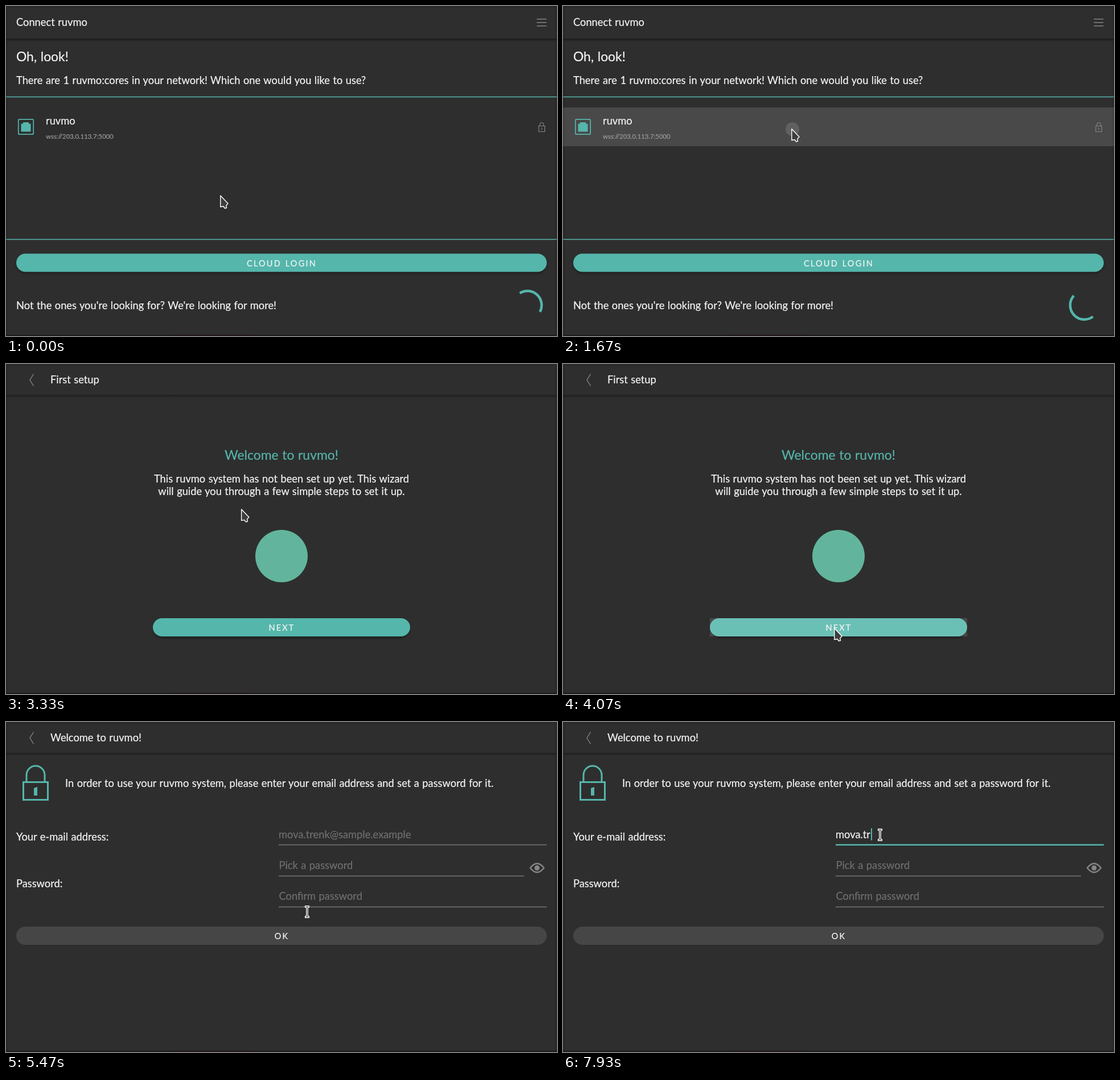
Recreate the animation shown at these times as an HTML page. Size 968 by 579 pixels, loop 8 s.

```html
<!DOCTYPE html>
<html lang="en">
<head>
<meta charset="utf-8">
<title>First setup</title>
<style>
  html, body { margin: 0; width: 100%; height: 100%; overflow: hidden; background: #2e2e2e; }
  svg { display: block; width: 100%; height: 100%; }
  text {
    font: 18.3px Lato, "Noto Sans", sans-serif; word-spacing: .8px; white-space: pre;
    color: #f6f6f6; fill: currentColor; stroke: currentColor; stroke-width: .2px;
  }
  .big { font-size: 22.9px; }
  .small { font-size: 11.3px; color: #9c9c9c; }
  .mid { text-anchor: middle; }
  .btn { font-size: 14.5px; letter-spacing: 2.2px; text-anchor: middle; }
  .hint { color: #6f6f6f; }
  .teal { color: #55b6ab; fill: currentColor; }
  .line { fill: none; stroke: #55b6ab; }
  .grey { fill: none; stroke: #858585; }
  .field { stroke: #757575; stroke-width: 1.5; }
  .glow { fill: #fff; opacity: .13; }
</style>
</head>
<body>
<svg viewBox="0 0 968 579">
  <defs>
    <linearGradient id="down" x2="0" y2="1">
      <stop stop-color="#000" stop-opacity=".38"/><stop offset="1" stop-color="#000" stop-opacity="0"/>
    </linearGradient>
    <linearGradient id="side">
      <stop stop-color="#000" stop-opacity="0"/><stop offset="1" stop-color="#000" stop-opacity=".35"/>
    </linearGradient>
    <filter id="soft" x="-5%" y="-50%" width="110%" height="200%"><feGaussianBlur stdDeviation="2"/></filter>
    <clipPath id="rowClip"><rect y="178" width="968" height="68"/></clipPath>
    <clipPath id="nextClip"><rect x="258" y="446" width="452" height="32"/></clipPath>
    <g id="back">
      <rect width="968" height="579" fill="#2e2e2e"/>
      <rect x="-9" width="9" height="579" fill="url(#side)"/>
    </g>
    <g id="bar">
      <rect y="54.500" width="968" height="4.500" fill="url(#down)"/>
      <path class="grey" d="M48.500 17.500L42 28l6.500 10.500" stroke-width="1.4"/>
    </g>
  </defs>
  <rect width="968" height="579" fill="#2e2e2e"/>

  <g id="connect">
    <use href="#back"/>
    <rect y="57" width="968" height="6" fill="url(#down)"/>
    <text x="18" y="35">Connect ruvmo</text>
    <path class="grey" d="M932.500 23h17M932.500 29h17M932.500 35h17" stroke-width="1.4"/>
    <text class="big" x="18" y="97">Oh, look!</text>
    <text x="18" y="136.500">There are 1 ruvmo:cores in your network! Which one would you like to use?</text>
    <path class="line" d="M0 159.500H968M0 409.500H968" stroke-width="1.6"/>
    <g clip-path="url(#rowClip)">
      <rect id="rowHover" class="glow" y="178" width="968" height="68"/>
      <circle id="rowRipple" class="glow" cx="403" cy="216"/>
    </g>
    <rect class="line" x="21.800" y="198.800" width="26.400" height="26.400" rx="2" stroke-width="1.7"/>
    <path class="teal" d="M26.500 206.500h3.500v-2.500h10v2.500h3.500v14h-17z"/>
    <text x="70" y="207.500">ruvmo</text>
    <text class="small" x="70" y="233">wss://203.0.113.7:5000</text>
    <path class="grey" d="M936 210.500h10.500v10H936zM938 210v-2a3.200 3.200 0 0 1 6.500 0v2M941.200 213.500v4" stroke-width="1.2"/>
    <rect x="19" y="437" width="930" height="32" rx="16" opacity=".4" filter="url(#soft)"/>
    <rect class="teal" x="18" y="434.500" width="932" height="32" rx="16"/>
    <text class="btn" x="484.500" y="456.500">CLOUD LOGIN</text>
    <text x="18" y="532">Not the ones you're looking for? We're looking for more!</text>
    <path id="spinner" class="line" stroke-width="4.500"/>
  </g>

  <g id="welcome">
    <use href="#back"/><use href="#bar"/>
    <text x="78" y="34">First setup</text>
    <text class="big mid teal" x="484" y="168">Welcome to ruvmo!</text>
    <text class="mid" x="484" y="208">This ruvmo system has not been set up yet. This wizard</text>
    <text class="mid" x="484" y="229.500">will guide you through a few simple steps to set it up.</text>
    <circle cx="484" cy="337" r="46" fill="#62b59c"/>
    <rect x="259" y="448.500" width="450" height="32" rx="16" opacity=".4" filter="url(#soft)"/>
    <rect class="teal" x="258" y="446" width="452" height="32" rx="16"/>
    <g clip-path="url(#nextClip)">
      <rect id="nextHover" class="glow" x="258" y="446" width="452" height="32"/>
      <circle id="nextRipple" class="glow" cx="476" cy="463"/>
    </g>
    <text class="btn" x="484.500" y="467.800">NEXT</text>
  </g>

  <g id="login">
    <use href="#back"/><use href="#bar"/>
    <text x="78" y="34">Welcome to ruvmo!</text>
    <path class="line" d="M30.500 105.500h43v31h-43zM36 105v-12a16 16 0 0 1 32 0v12" stroke-width="3"/>
    <path class="teal" d="M49 116l6-2v15h-6z"/>
    <text x="104" y="114">In order to use your ruvmo system, please enter your email address and set a password for it.</text>
    <text x="18" y="208">Your e-mail address:</text>
    <text x="18" y="289.500">Password:</text>
    <text id="mail" x="479" y="203.500"></text>
    <text class="hint" x="479.500" y="257.500">Pick a password</text>
    <text class="hint" x="479.500" y="311.500">Confirm password</text>
    <path class="field" d="M479 270.300H910M479 324.500H950"/>
    <path id="mailLine" class="field" d="M479 215.500H950"/>
    <rect id="caret" class="teal" y="186.500" width="2" height="21"/>
    <path class="grey" d="M921 256Q933 240.500 945 256Q933 271.500 921 256Z" stroke-width="2.300"/>
    <circle cx="933" cy="256" r="4.500" fill="#858585"/>
    <rect x="18" y="359" width="932" height="32" rx="16" fill="#464646"/>
    <text class="btn" x="484.500" y="380.500">OK</text>
  </g>

  <rect y="577.300" width="968" height="1.700" fill="#1d1d1d"/>
  <rect x="292" y="577.300" width="138" height="1.700" fill="#2a1719"/>
  <rect width="968" height="579" fill="none" stroke="#000" stroke-width="6" opacity=".1"/>
  <path id="arrow" d="M.8 .8V20.500L6 19.500 8.500 23 11.500 22.300 10.800 18 14 14.600Z" fill="#3d3d3d" stroke="#fff" stroke-width="1.4" stroke-linejoin="round"/>
  <g id="beam" fill="none">
    <path d="M-4-9H4M0-9V9M-4 9H4" stroke="#fff" stroke-width="3.800"/>
    <path d="M-3-9H3M0-9V9M-3 9H3" stroke="#333" stroke-width="1.200"/>
  </g>
</svg>
<script>
const LOOP = 8000, STEP = 1000 / 15;
const $ = id => document.getElementById(id);
const set = (id, attrs) => { for (const k in attrs) $(id).setAttribute(k, attrs[k]); };
const show = (id, on) => set(id, { display: on ? 'inline' : 'none' });
const ramp = (t, from, len) => Math.min(1, Math.max(0, (t - from) / len));
const smooth = u => u * u * (3 - 2 * u);
const outCubic = u => 1 - (1 - u) ** 3;

const TO_WELCOME = 1840, TO_LOGIN = 4567, PUSH = 200;
const FOCUS = 6130;
const HINT = 'mova.trenk@sample.example';
const KEYS = [[6730, 1], [7000, 2], [7400, 4], [7670, 5], [7800, 6], [7930, 7]];

// pointer stops: time, x, y
const STOPS = [
  [70, 376, 332], [930, 401, 215], [3133, 401, 215], [3930, 476, 463], [4900, 476, 463],
  [5470, 529, 333], [5735, 648, 138], [5930, 557, 198]
];

function pointer(t) {
  let a = STOPS[0], b = a;
  for (const s of STOPS) {
    b = s;
    if (s[0] > t) break;
    a = s;
  }
  const u = a === b ? 0 : smooth(ramp(t, a[0], b[0] - a[0]));
  return [a[1] + (b[1] - a[1]) * u, a[2] + (b[2] - a[2]) * u];
}

// The incoming page slides from half the width while the old one leaves.
function page(id, t, enter, leave) {
  const a = outCubic(ramp(t, enter, PUSH)), b = outCubic(ramp(t, leave, PUSH));
  set(id, { transform: `translate(${484 * (1 - a) - 484 * b} 0)`, opacity: a * (1 - b) });
  show(id, a > 0 && b < 1);
}

// The arc grows from its head, then shrinks from its tail, under a steady turn.
function spinner(t) {
  const time = 197 + t * 0.859, cycle = Math.floor(time / 1400), part = time % 1400;
  const grow = part < 700, u = (part % 700) / 700;
  const tail = grow ? 0 : 290 * u * u;
  const head = grow ? 10 + 290 * (1 - (1 - u) ** 2) : 300;
  const base = -156 + 290 * cycle + time * 720 / 4200;
  const at = deg => {
    const r = (base + deg) * Math.PI / 180;
    return `${916 + 25 * Math.cos(r)} ${525 + 25 * Math.sin(r)}`;
  };
  set('spinner', { d: `M${at(tail)}A25 25 0 ${head - tail > 180 ? 1 : 0} 1 ${at(head)}` });
}

function press(name, t, hover, down) {
  set(name + 'Hover', { style: `opacity:${0.13 * ramp(t, hover, 150)}` });
  set(name + 'Ripple', { r: Math.max(0, t - down) * 0.45 });
}

function typing(t) {
  let count = 0;
  for (const [when, n] of KEYS) if (t >= when - 5) count = n;
  const focus = t >= FOCUS - 5, mail = $('mail');
  mail.textContent = count ? HINT.slice(0, count) : HINT;
  mail.setAttribute('class', count ? '' : 'hint');
  set('mailLine', { style: focus ? 'stroke:#55b6ab;stroke-width:2.5' : '' });
  show('caret', focus);
  set('caret', { x: 479 + (count ? mail.getComputedTextLength() + 1 : 0) });
}

function draw(t) {
  page('connect', t, -PUSH, TO_WELCOME);
  page('welcome', t, TO_WELCOME, TO_LOGIN);
  page('login', t, TO_LOGIN, LOOP + 1);
  spinner(t);
  press('row', t, 600, 1640);
  press('next', t, 3780, 4070);
  typing(t);

  const [x, y] = pointer(t);
  const inField = [[180, 218], [234, 272], [288, 336]].some(([a, b]) => y >= a && y <= b);
  const beam = t > TO_LOGIN + PUSH && x > 479 && inField;
  show('beam', beam);
  show('arrow', !beam);
  set(beam ? 'beam' : 'arrow', { transform: `translate(${x} ${y})` });
}

const start = performance.now();
function tick() {
  const t = (performance.now() - start) % LOOP;
  draw(Math.floor((t + 4) / STEP) * STEP);
  requestAnimationFrame(tick);
}
tick();
</script>
</body>
</html>
```
